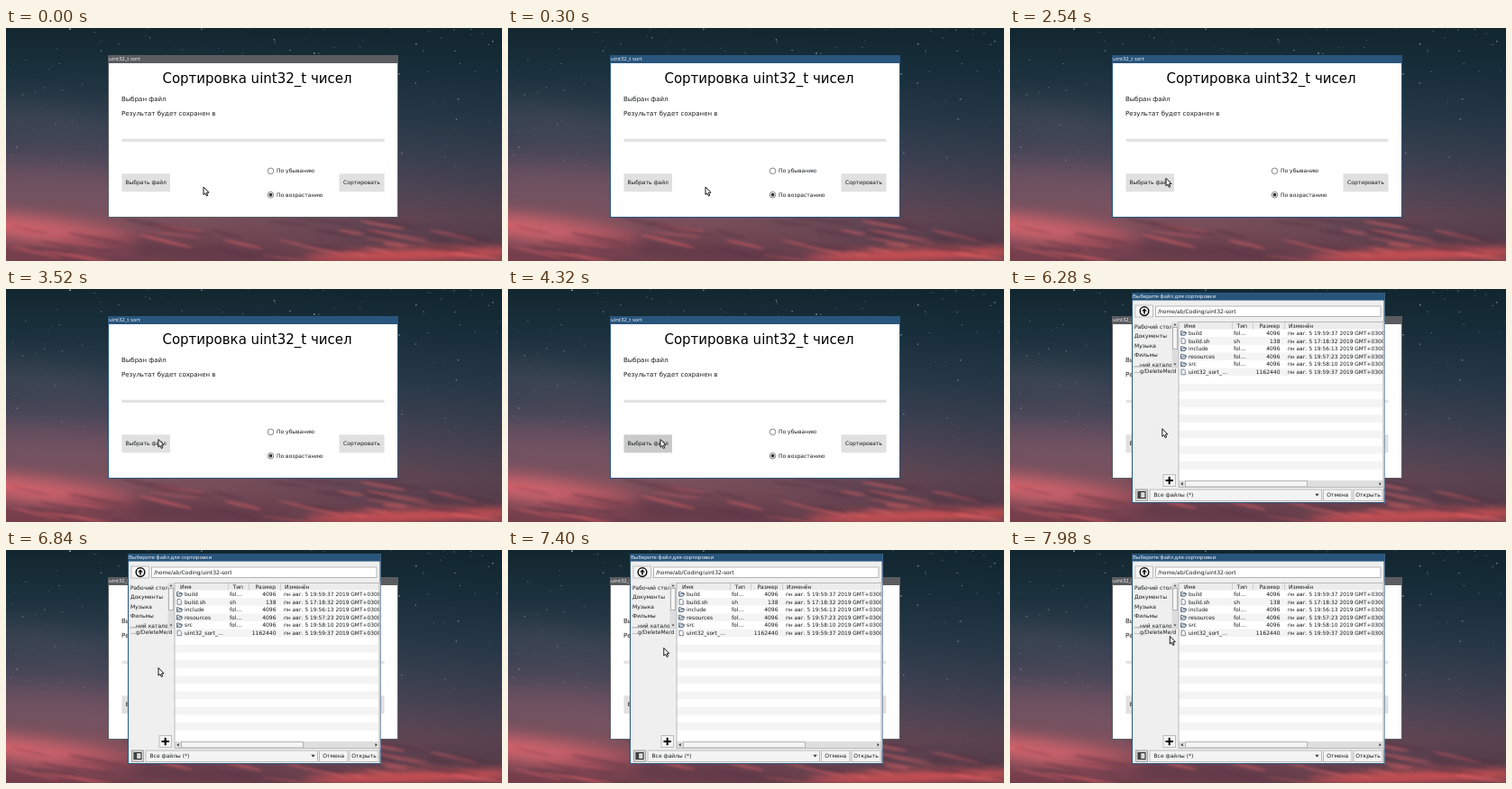
These frames come from a looping animation (550x258 px, 8000 ms). An HTML page with a canvas:

```html
<!DOCTYPE html>
<html lang="ru">
<head>
<meta charset="utf-8">
<title>uint32_t sort</title>
<style>
html, body { margin: 0; width: 100%; height: 100%; overflow: hidden; background: #14242d; }
canvas { display: block; width: 550px; height: 258px; }
</style>
</head>
<body>
<canvas id="stage" width="550" height="258"></canvas>
<script>
const W = 550, H = 258, LOOP = 8000;
const BLUE = '#29557c', GREY = '#5b5c60', INK = '#16181a';
const SANS = '"DejaVu Sans", sans-serif', TITLE = '"Noto Sans", sans-serif';
const stage = document.getElementById('stage').getContext('2d');
let g = stage;

function layer(draw) {
  const canvas = document.createElement('canvas');
  canvas.width = W;
  canvas.height = H;
  g = canvas.getContext('2d');
  draw();
  g = stage;
  return canvas;
}

function rect(x, y, w, h, fill, line) {
  g.fillStyle = fill;
  g.fillRect(x, y, w, h);
  if (line) {
    g.strokeStyle = line;
    g.lineWidth = 1;
    g.strokeRect(x + .5, y + .5, w - 1, h - 1);
  }
}

function text(s, x, midY, size = 6, { font = SANS, color = INK, align = 'left' } = {}) {
  g.font = `${size}px ${font}`;
  g.fillStyle = color;
  g.textAlign = align;
  g.fillText(s, x, midY + size * .365);
}

function disc(x, y, r, fill, line, width = .8) {
  g.beginPath();
  g.arc(x, y, r, 0, 7);
  if (fill) { g.fillStyle = fill; g.fill(); }
  if (line) { g.strokeStyle = line; g.lineWidth = width; g.stroke(); }
}

function poly(points, fill, line, width = .8) {
  g.beginPath();
  points.forEach(([x, y]) => g.lineTo(x, y));
  g.closePath();
  if (fill) { g.fillStyle = fill; g.fill(); }
  if (line) { g.strokeStyle = line; g.lineWidth = width; g.stroke(); }
}

function clipped(x, y, w, h, draw) {
  g.save();
  g.beginPath();
  g.rect(x, y, w, h);
  g.clip();
  draw();
  g.restore();
}

function random(seed) {
  return () => (seed = (seed * 16807) % 2147483647) / 2147483647;
}

function cloud(x, y, rx, ry, tilt, color, blur) {
  g.filter = `blur(${blur}px)`;
  g.fillStyle = color;
  g.beginPath();
  g.ellipse(x, y, rx, ry, tilt, 0, 7);
  g.fill();
  g.filter = 'none';
}

function drawSky() {
  const rnd = random(4217);
  const sky = g.createLinearGradient(0, 0, 0, H);
  [[0, '#12272f'], [.18, '#1a303c'], [.38, '#2c3d4b'], [.55, '#454658'],
   [.7, '#604d5d'], [.82, '#7a505c'], [1, '#74424f']]
    .forEach(([at, color]) => sky.addColorStop(at, color));
  rect(0, 0, W, H, sky);

  const shade = g.createLinearGradient(200, 0, W, 0);
  shade.addColorStop(0, 'rgba(14,36,48,0)');
  shade.addColorStop(1, 'rgba(14,36,48,.3)');
  rect(0, 0, W, H, shade);

  // Dusk haze on the left, then the lit and dark cloud banks
  cloud(45, 105, 85, 14, .15, 'rgba(104,88,104,.38)', 16);
  cloud(50, 175, 120, 24, .06, 'rgba(150,94,106,.42)', 18);
  cloud(25, 222, 125, 13, .13, 'rgba(232,106,114,.8)', 9);
  cloud(190, 246, 130, 9, .05, 'rgba(88,52,68,.7)', 8);
  cloud(470, 225, 110, 10, .03, 'rgba(82,60,78,.5)', 9);
  cloud(460, 251, 130, 6, -.03, 'rgba(236,86,88,.85)', 5);
  cloud(30, 254, 80, 6, .1, 'rgba(120,56,70,.55)', 6);

  for (let i = 0; i < 44; i++) {
    const lit = rnd() < .5;
    cloud(rnd() * W, 206 + rnd() * 52, 12 + rnd() * 30, .7 + rnd() * 1.6, .1 + rnd() * .14,
      lit ? 'rgba(238,104,108,.42)' : 'rgba(82,48,64,.38)', 1.5);
  }

  for (let i = 0; i < 190; i++) {
    const y = rnd() ** 1.3 * 170, size = .6 + rnd() ** 3 * 1;
    g.fillStyle = `rgba(222,232,236,${(.25 + rnd() * .65) * (1 - y / 230)})`;
    g.fillRect(rnd() * W, y, size, size);
  }
}

function drawFrame(x, y, w, h, barH, color, title, body) {
  rect(x, y, w, h, body);
  rect(x, y, w, barH, color);
  g.strokeStyle = color;
  g.lineWidth = 1;
  g.strokeRect(x + .5, y + .5, w - 1, h - 1);
  text(title, x + 1, y + 4.2, 5.9, { font: TITLE, color: '#f2f4f6' });
}

function radio(y, label, on) {
  disc(293.5, y, 3.3, '#fff', '#666');
  if (on) disc(293.5, y, 1.9, '#333');
  text(label, 300, y);
}

function drawMain(color, pressed) {
  drawFrame(113, 30, 322, 180, 9, color, 'uint32_t sort', '#fff');
  text('Сортировка uint32_t чисел', 278.5, 56, 15, { align: 'center', color: '#000' });
  text('Выбран файл', 128, 78.3, 7);
  text('Результат будет сохранен в', 128, 94.3, 7);
  rect(128.5, 122.7, 291, 3.2, '#e3e3e3');
  radio(158.3, 'По убыванию', false);
  radio(184.7, 'По возрастанию', true);
  rect(128.5, 161.3, 53.5, 20, pressed ? '#cacaca' : '#e0e0e0');
  rect(369.5, 161.3, 50, 20, '#e0e0e0');
  text('Выбрать файл', 155.2, 171.2, 6, { align: 'center' });
  text('Сортировать', 394.5, 171.2, 6, { align: 'center' });
}

function folderIcon(x, y) {
  poly([[x, y + 2.2], [x, y - 2.4], [x + 2, y - 2.4], [x + 2.6, y - 1.5], [x + 4.8, y - 1.5],
    [x + 4.8, y - .4], [x + 6, y - .4], [x + 4.7, y + 2.2]], '#fff', '#3a4c60', .8);
  poly([[x, y + 2.2], [x + 1.4, y - .4], [x + 6, y - .4], [x + 4.7, y + 2.2]], '#dfe8f0', '#3a4c60', .6);
}

function fileIcon(x, y) {
  poly([[x + .6, y - 2.8], [x + 3.4, y - 2.8], [x + 4.8, y - 1.4], [x + 4.8, y + 2.8], [x + .6, y + 2.8]],
    '#fff', '#44566a', .7);
}

function drawSidebar() {
  rect(136, 36, 51, 185, '#efefef');
  clipped(136, 36, 43.5, 50.5, () => {
    ['Рабочий стол', 'Документы', 'Музыка', 'Фильмы', '…ний каталог']
      .forEach((place, i) => text(place, 138, 41.8 + i * 10.5));
  });
  clipped(136, 86.5, 50, 12, () => text('…g/DeleteMe/d', 138, 91));
  rect(179.5, 36.5, 7, 50, '#dcdcdc');
  rect(180, 42, 6, 25, '#f5f5f5', '#b0b0b0');
  poly([[181.5, 40.3], [184.5, 40.3], [183, 38.3]], '#444');
  poly([[181.5, 82.5], [184.5, 82.5], [183, 84.5]], '#444');
  rect(136, 86, 51, .6, '#c4c4c4');
  rect(169.5, 205, 14.5, 14, '#f4f4f4', '#bcbcbc');
  rect(172.5, 211, 8.4, 2, '#000');
  rect(175.7, 207.8, 2, 8.4, '#000');
}

function drawTable() {
  const top = 44.5, rowH = 8.62;
  rect(187, 36, 227.5, 184, '#fff');
  for (let i = 1; top + (i + 1) * rowH < 212; i += 2) {
    rect(187, top + i * rowH, 227.5, rowH, '#f4f4f4');
  }
  rect(187, 36.5, 227.5, 8, '#ececec');
  [246, 269, 304].forEach(x => rect(x, 37, .7, 7.5, '#c2c2c2'));
  text('Имя', 193, 40.7);
  text('Тип', 251.5, 40.7);
  text('Размер', 299, 40.7, 6, { align: 'right' });
  text('Изменён', 309, 40.7);

  const rows = [
    ['build', 'fol…', '4096', '19:59:37'],
    ['build.sh', 'sh', '138', '17:18:32'],
    ['include', 'fol…', '4096', '19:56:13'],
    ['resources', 'fol…', '4096', '19:57:23'],
    ['src', 'fol…', '4096', '19:58:10'],
    ['uint32_sort_…', '', '1162440', '19:59:37']
  ];
  clipped(187, 36, 227.5, 176, () => rows.forEach(([name, type, size, time], i) => {
    const y = top + (i + .5) * rowH;
    (type === 'fol…' ? folderIcon : fileIcon)(189.5, y);
    text(name, 198, y);
    text(type, 248, y);
    text(size, 299.5, y, 6, { align: 'right' });
    text(`пн авг. 5 ${time} 2019 GMT+0300`, 308, y, 5.9);
  }));

  rect(187, 212, 227.5, 7.5, '#dedede');
  rect(194, 212, 136, 7.5, '#f4f4f4', '#b4b4b4');
  poly([[191.6, 214], [191.6, 217.4], [189.4, 215.7]], '#333');
  poly([[409.5, 214], [409.5, 217.4], [411.7, 215.7]], '#333');
  g.strokeStyle = '#b8b8b8';
  g.strokeRect(187, 36.5, 227, 183);
}

function button(x, w, label) {
  rect(x, 221.5, w, 13.5, '#f4f4f4', '#bcbcbc');
  if (label) text(label, x + w / 2, 228, 6, { align: 'center' });
}

function drawDialog() {
  drawFrame(135, 4, 280.5, 233, 8.6, BLUE, 'Выберите файл для сортировки', '#efefef');
  rect(138.5, 17.5, 20.5, 14, '#f4f4f4', '#c0c0c0');
  disc(149, 24.6, 4.8, '#fff', '#0c0c0c', 1.5);
  poly([[149, 21.4], [152, 24.6], [149.8, 24.6], [149.8, 27.6], [148.2, 27.6], [148.2, 24.6], [146, 24.6]], '#0c0c0c');
  rect(161, 18.5, 250.5, 12.5, '#fff', '#b4b4b4');
  text('/home/ab/Coding/uint32-sort', 164, 24.8);
  drawSidebar();
  drawTable();

  rect(139, 221.5, 14, 13.5, '#d2d2d2', '#a8a8a8');
  rect(141.5, 224, 9, 8, '#d8d8d8', '#222');
  rect(142, 224.5, 3.2, 7, '#444');
  button(154.5, 191.5);
  text('Все файлы (*)', 159.5, 228);
  poly([[338.3, 226.7], [342.7, 226.7], [340.5, 229.5]], '#333');
  button(347, 32.5, 'Отмена');
  button(380.5, 33, 'Открыть');
}

function drawCursor(x, y) {
  g.save();
  g.translate(x, y);
  g.lineJoin = 'round';
  poly([[0, 0], [0, 8.6], [1.9, 6.9], [3.4, 10], [4.8, 9.3], [3.4, 6.4], [6, 6.2]], '#fff', '#0a0a0a', .95);
  g.restore();
}

// Pointer path: time, x, y
const path = [
  [0, 219, 176], [2539, 219, 176], [2540, 173, 166.3], [2920, 168.3, 167],
  [3519, 168.3, 167], [3520, 169, 166.5], [5899, 169, 166.5], [5900, 168.8, 166.4],
  [6020, 168.8, 166], [6840, 169, 130.5], [7580, 174, 101.3], [7680, 174, 101.3],
  [7840, 177.3, 96], [7979, 177.3, 96], [7980, 177.3, 95.5], [LOOP, 177.3, 95.5]
];

function pointerAt(t) {
  const i = path.findIndex(point => point[0] > t);
  const [t0, x0, y0] = path[i - 1], [t1, x1, y1] = path[i];
  const k = (t - t0) / (t1 - t0);
  return [x0 + (x1 - x0) * k, y0 + (y1 - y0) * k];
}

const sky = layer(drawSky);
const views = {
  idle: layer(() => drawMain(GREY, false)),
  active: layer(() => drawMain(BLUE, false)),
  pressed: layer(() => drawMain(BLUE, true)),
  dialog: layer(() => { drawMain(GREY, false); drawDialog(); })
};

function viewAt(t) {
  if (t < 300) return views.idle;
  if (t < 4320) return views.active;
  return t < 4500 ? views.pressed : views.dialog;
}

const start = performance.now();
function render() {
  const t = Math.max(0, performance.now() - start) % LOOP;
  g.drawImage(sky, 0, 0);
  g.drawImage(viewAt(t), 0, 0);
  drawCursor(...pointerAt(t));
  requestAnimationFrame(render);
}
render();
</script>
</body>
</html>
```
